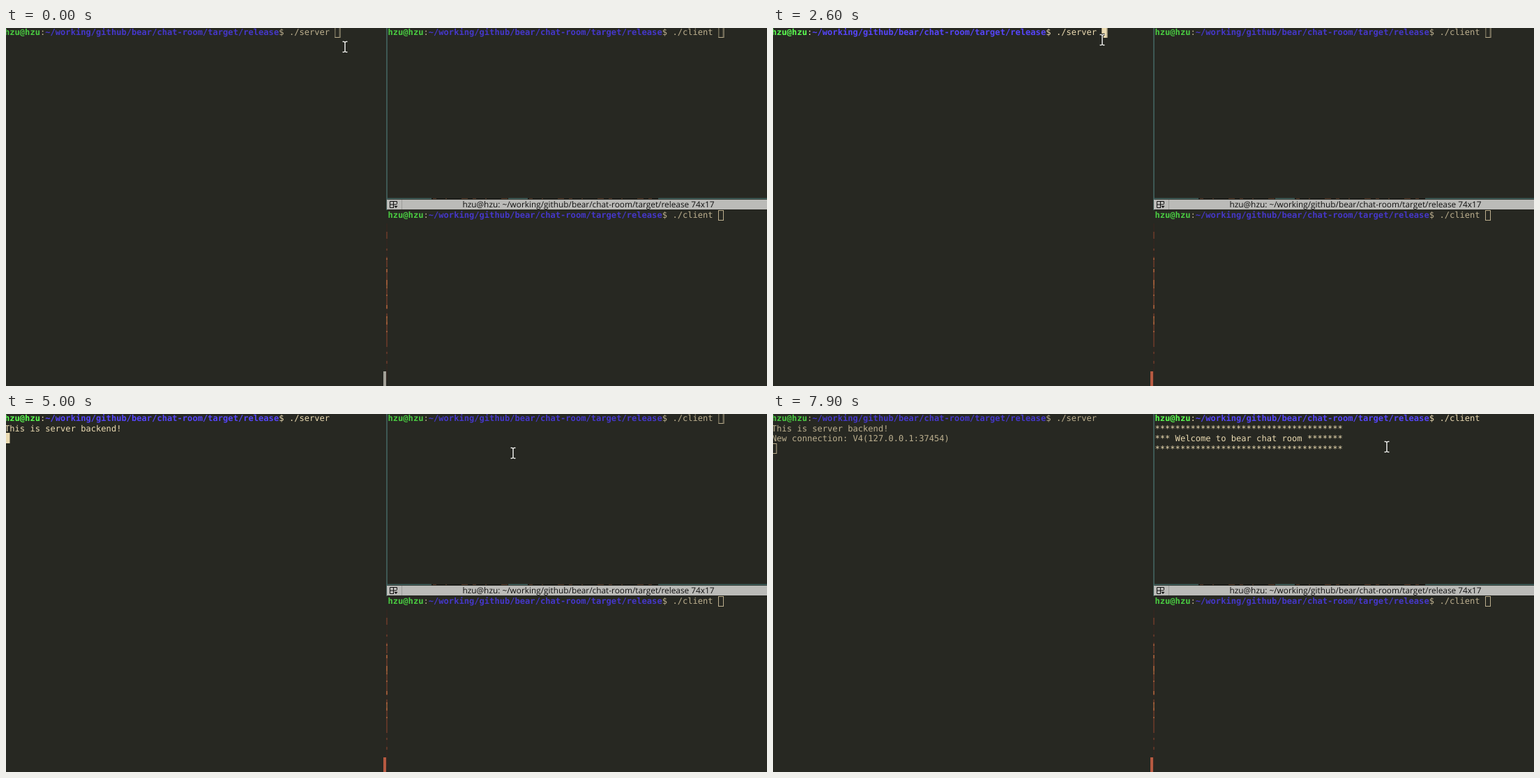
Animation, 1091 px wide and 513 px high, one loop 8 s. Source, as an HTML page:

```html
<!DOCTYPE html>
<html lang="en">
<head>
<meta charset="utf-8">
<title>Chat room terminals</title>
<style>
html, body { margin: 0; width: 100%; height: 100%; overflow: hidden; background: #272822; }
svg { display: block; width: 1091px; height: 513px; }
text { font: 12.1px "DejaVu Sans Mono", monospace; fill: #ebdbb2; white-space: pre; text-rendering: geometricPrecision; }
.user, .path { font-weight: bold; }
.user { fill: #5cff52; }
.path { fill: #5645fb; }
.title { font: 11.85px "Open Sans", sans-serif; fill: #111; text-anchor: middle; }
.cursor { fill: #ebdbb2; stroke: #ebdbb2; }
.hollow { fill-opacity: 0; }
.dim { filter: brightness(.8); }

/* one loop is 8 s, so 100 ms = 1.25% */
.left, .right, .left-cursor, .right-cursor, .pointer, .backend, .joined, .welcome, .thumb {
  animation: 8s step-end infinite;
}
.left { animation-name: left; }
.right { animation-name: right; }
.left-cursor { animation-name: left-cursor; }
.right-cursor { animation-name: right-cursor; }
.pointer { animation-name: pointer; }
.backend { animation-name: backend; }
.joined { animation-name: joined; }
.welcome { animation-name: welcome; }
.thumb { animation-name: thumb; }

@keyframes left {
  0%, 72.5%, 100% { filter: brightness(.8); }
  32.5% { filter: none; }
}
@keyframes right {
  0%, 100% { filter: brightness(.8); }
  72.5% { filter: none; }
}
@keyframes thumb {
  0%, 100% { fill: #a3a198; }
  32.5% { fill: #b65a41; }
}
@keyframes backend { 0%, 100% { opacity: 0; } 46.25% { opacity: 1; } }
@keyframes joined { 0%, 100% { opacity: 0; } 86.25% { opacity: 1; } }
@keyframes welcome { 0%, 100% { opacity: 0; } 85% { opacity: 1; } }
@keyframes left-cursor {
  0%, 100% { transform: translate(473.5px, 0); fill-opacity: 0; opacity: 1; }
  32.5% { transform: translate(473.5px, 0); fill-opacity: 1; opacity: 1; }
  42.5% { transform: translate(466px, 0); fill-opacity: 1; opacity: 1; }
  46.25% { transform: translate(0, 28px); fill-opacity: 1; opacity: 1; }
  52.5% { transform: translate(0, 28px); fill-opacity: 1; opacity: 0; }
  60% { transform: translate(0, 28px); fill-opacity: 1; opacity: 1; }
  67.5% { transform: translate(0, 28px); fill-opacity: 1; opacity: 0; }
  72.5% { transform: translate(0, 28px); fill-opacity: 0; opacity: 1; }
  86.25% { transform: translate(0, 43px); fill-opacity: 0; opacity: 1; }
}
@keyframes right-cursor {
  0%, 100% { transform: translate(474px, 0); fill-opacity: 0; opacity: 1; }
  72.5% { transform: translate(474px, 0); fill-opacity: 1; opacity: 1; }
  81.25% { transform: translate(467px, 0); fill-opacity: 1; opacity: 1; }
  85% { transform: translate(0, 58px); fill-opacity: 1; opacity: 1; }
  96.25% { transform: translate(0, 58px); fill-opacity: 1; opacity: 0; }
}
@keyframes pointer {
  0%, 100% { transform: translate(486px, 27px); opacity: 1; }
  6.25% { transform: translate(483px, 20px); opacity: 1; }
  7.5% { transform: translate(481px, 22px); opacity: 1; }
  11.25% { transform: translate(477px, 16px); opacity: 1; }
  28.75% { transform: translate(475px, 17px); opacity: 1; }
  30% { transform: translate(472px, 17px); opacity: 1; }
  40% { transform: translate(472px, 17px); opacity: 0; }
  57.5% { transform: translate(475px, 17px); opacity: 1; }
  58.75% { transform: translate(502px, 21px); opacity: 1; }
  60% { transform: translate(572px, 33px); opacity: 1; }
  61.25% { transform: translate(668px, 49px); opacity: 1; }
  62.5% { transform: translate(727px, 56px); opacity: 1; }
  65% { transform: translate(775px, 52px); opacity: 1; }
  66.25% { transform: translate(862px, 42px); opacity: 1; }
  67.5% { transform: translate(945px, 32px); opacity: 1; }
  68.75% { transform: translate(990px, 26px); opacity: 1; }
  70% { transform: translate(1004px, 25px); opacity: 1; }
  80% { transform: translate(1004px, 25px); opacity: 0; }
  96.25% { transform: translate(996px, 26px); opacity: 1; }
  97.5% { transform: translate(945px, 36px); opacity: 1; }
  98.75% { transform: translate(880px, 47px); opacity: 1; }
}
</style>
</head>
<body>
<svg viewBox="0 0 1091 513">
  <defs>
    <g id="prompt">
      <text y="10.3"><tspan class="user">hzu@hzu</tspan>:<tspan class="path">~/working/github/bear/chat-room/target/release</tspan>$ </text>
    </g>
    <path id="beam" d="M-3.5 -7.5H-1.5L0 -6.5L1.5 -7.5H3.5M0 -6.5V6.5M-3.5 7.5H-1.5L0 6.5L1.5 7.5H3.5" fill="none"/>
  </defs>

  <g class="left">
    <g transform="translate(-2 0)">
      <use href="#prompt"/>
      <text x="407.9" y="10.3">./server</text>
      <text class="backend" y="24.7">This is server backend!</text>
      <text class="joined" y="39.1">New connection: V4(127.0.0.1:37454)</text>
      <rect class="cursor left-cursor" y="-.5" width="7" height="14"/>
    </g>
  </g>
  <rect class="thumb" x="541" y="492" width="4" height="21"/>

  <g class="right">
    <g transform="translate(547.5 0)">
      <use href="#prompt"/>
      <text x="407.9" y="10.3">./client</text>
      <g class="welcome">
        <text y="24.7">*************************************</text>
        <text y="39.1">*** Welcome to bear chat room *******</text>
        <text y="53.5">*************************************</text>
      </g>
      <rect class="cursor right-cursor" y="-.5" width="7" height="14"/>
    </g>
  </g>

  <g class="dim" transform="translate(547.5 262)">
    <use href="#prompt"/>
    <text x="407.9" y="10.3">./client</text>
    <rect class="cursor hollow" x="474" y="-.5" width="7" height="14"/>
  </g>

  <!-- pane borders -->
  <g fill="none">
    <path d="M546 0V261M546 244.5H610M720 244.5H748M935 244.5H1091" stroke="#456866" stroke-width="1.5"/>
    <path d="M610 244.5H720M748 244.5H935" stroke="#191a17"/>
    <path d="M612 244.5H720M750 244.5H935" stroke="#593c2b" stroke-dasharray="5 13 2 21 9 7"/>
    <path d="M546 280V505" stroke="#3a251f"/>
    <path d="M546 292V500" stroke="#8a4630" stroke-dasharray="10 14 3 9 15 3 22 4 31 6 7 5 36 7 3 10 4 19"/>
    <path d="M546 330V436" stroke="#d07a48" stroke-dasharray="2 13 5 11 12 9"/>
  </g>

  <!-- title bar -->
  <rect x="546" y="246" width="545" height="14" fill="#bbbbb8"/>
  <path d="M567.5 246V260" stroke="#9c9c99"/>
  <path d="M550.5 248.5H560.5V252M550.5 248.5V257.5H556M555.5 248.5V257.5M550.5 253H560.5" fill="none" stroke="#111"/>
  <path d="M556.5 255H561.5L559 258Z" fill="#111"/>
  <text class="title" x="835" y="257.3">hzu@hzu: ~/working/github/bear/chat-room/target/release 74x17</text>

  <g class="pointer">
    <use href="#beam" stroke="#171814" stroke-width="3.4"/>
    <use href="#beam" stroke="#f4f4f0" stroke-width="1.5"/>
  </g>
</svg>
</body>
</html>
```
